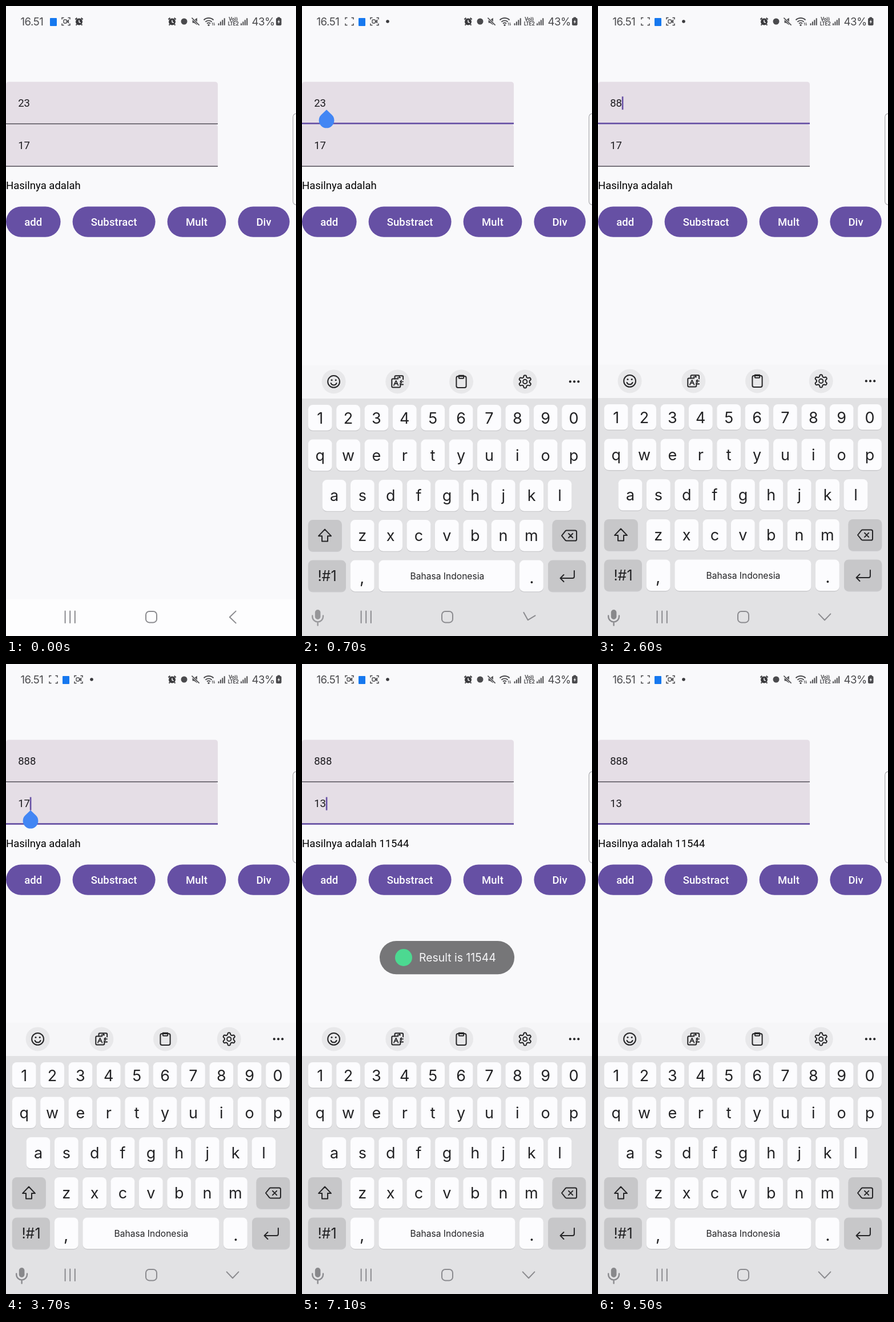
Recreate the animation shown at these times as an HTML page. Size 508 by 1101 pixels, loop 9.7 s.

```html
<!DOCTYPE html>
<html lang="id">
<head>
<meta charset="utf-8">
<title>Calculator demo</title>
<style>
html, body { margin: 0; width: 100%; height: 100%; overflow: hidden; background: #f9f9fb; }
svg { display: block; width: 100vw; height: 100vh; }
.app { font: 18.52px Roboto, sans-serif; fill: #1c1b1f; }
.ui { font-family: Inter, Roboto, sans-serif; }
.mid { text-anchor: middle; }
.line { fill: none; stroke: #252527; stroke-width: 2; stroke-linecap: round; stroke-linejoin: round; }
.nav { fill: none; stroke: #8b8b8f; stroke-width: 2; stroke-linecap: round; stroke-linejoin: round; }
.stat { fill: none; stroke: #4a4a4d; stroke-width: 1.5; }
</style>
</head>
<body>
<svg id="stage" viewBox="0 0 508 1101" preserveAspectRatio="none"></svg>
<script>
const LOOP = 9700, PURPLE = '#6650a4', DARK = '#4a4a4d';
const PITCH = 49.37;

const rect = (x, y, w, h, r, fill, more = '') =>
  `<rect x="${x}" y="${y}" width="${w}" height="${h}" rx="${r}" fill="${fill}" ${more}/>`;
const circle = (x, y, r, fill, more = '') =>
  `<circle cx="${x}" cy="${y}" r="${r}" fill="${fill}" ${more}/>`;
const path = (d, cls = 'line', more = '') => `<path d="${d}" class="${cls}" ${more}/>`;
const text = (x, y, s, cls, more = '') => `<text x="${x}" y="${y}" class="${cls}" ${more}>${s}</text>`;
const group = (id, body, more = '') => `<g id="${id}" ${more}>${body}</g>`;
const at = (x, y, body) => `<g transform="translate(${x} ${y})">${body}</g>`;

// ---- status bar ----
const brackets = path('M-7 -3.5V-6.5H-3.5M3.5 -6.5H7V-3.5M7 3.5V6.5H3.5M-3.5 6.5H-7V3.5', 'stat');
const camera = rect(-4, -3, 5.4, 6, 1.4, 'none', `stroke="${DARK}" stroke-width="1.4"`) +
  path('M1.8 0L4.4 -2.2V2.2Z', 'stat', 'stroke-width="1"');
const alarm = circle(0, .6, 6, '#3a3a3d') + path('M-6.6 -3.6L-3.6 -6.2M6.6 -3.6L3.6 -6.2M-4 5L-5.4 6.6M4 5L5.4 6.6',
  'stat', 'style="stroke:#3a3a3d;stroke-width:2"') + path('M0 -2.6V1L2.6 2.2', 'stat', 'style="stroke:#f9f9fb"');

function bars(x) {
  let s = '';
  for (let i = 0; i < 4; i++) s += rect(x + i * 3.4, 30.2 - i * 3, 2, 3.6 + i * 3, .6, DARK);
  return s;
}

const wifi = path('M-8.5 -2.5A12.2 12.2 0 0 1 8.5 -2.5M-5.6 .7A8 8 0 0 1 5.6 .7M-2.9 3.7A4.2 4.2 0 0 1 2.9 3.7',
  'stat', 'style="stroke-width:1.9"') + circle(0, 6.3, 1.6, DARK) +
  path('M7 7V2.2L5.8 3.6M9.6 2V6.8L10.8 5.4', 'stat', 'style="stroke-width:1"');
const muted = path('M-5.4 -2.4H-2.6L2.8 -6.2V6.2L-2.6 2.4H-5.4Z', '', `fill="${DARK}"`) +
  path('M-6.6 -6.4L6.6 6.6', 'stat', 'style="stroke:#f9f9fb;stroke-width:3.4"') +
  path('M-6.6 -6.4L6.6 6.6', 'stat');

const small = `fill="${DARK}" font-weight="700" font-size="8.4" letter-spacing="-.3"`;
const big = `fill="${DARK}" font-size="18.6" letter-spacing="-.45"`;
const status = text(25.5, 34, '16.51', 'ui', big) +
  group('recNew', brackets + group('recCam', camera)) +
  group('bag', rect(-6, -6, 12, 14, 1, '#1678ef')) +
  group('rec', brackets + camera) +
  group('bell', alarm) + circle(150, 27, 2.8, '#3a3a3d', 'id="dot"') +
  at(291, 27, alarm) + circle(312, 27, 5.5, DARK) + at(332, 27, muted) + at(355, 27, wifi) +
  bars(371.5) + text(398, 26, 'Vo))', 'ui mid', small) + text(398, 34.3, 'LTE2', 'ui mid', small) +
  bars(411) + text(430.5, 34, '43%', 'ui', big) +
  rect(473, 21, 9.5, 13, 2, DARK) + rect(475.5, 19.6, 4.5, 2, .5, DARK) +
  path('M478.6 23.6L475.6 28.2H477.6L476.8 31.6L480 26.8H478Z', '', 'fill="#f9f9fb"');

// ---- app ----
const field = y => path(`M0 ${y + 74}V${y + 5}Q0 ${y} 5 ${y}H366Q371 ${y} 371 ${y + 5}V${y + 74}Z`, '', 'fill="#e5dee6"');
const button = (x, w, s) => rect(x, 350.5, w, 53.2, 26.6, PURPLE) +
  text(x + w / 2, 383.7, s, 'app mid', 'style="fill:#fff;font-weight:500;letter-spacing:.13px"');

const app = field(132.5) + field(206.7) +
  rect(0, 205, 371, 1.4, 0, '#49454f', 'id="under1"') + rect(0, 279.2, 371, 1.4, 0, '#49454f', 'id="under2"') +
  text(21.2, 176.2, '', 'app', 'id="value1"') + text(21.2, 250.4, '', 'app', 'id="value2"') +
  rect(0, 0, 2.6, 23, 0, PURPLE, 'id="caret"') +
  group('handle', path('M0 -18.5L9.6 -9.2A13.4 13.4 0 1 1 -9.6 -9.2Z', '', 'fill="#4286f4"')) +
  text(0, 319.8, '', 'app', 'id="result" style="fill:#000"') +
  button(0, 95.6, 'add') + button(116.6, 145, 'Substract') + button(282.6, 102.8, 'Mult') + button(406.4, 90.4, 'Div') +
  `<clipPath id="pill">${rect(282.6, 350.5, 102.8, 53.2, 26.6, '#000')}</clipPath>` +
  circle(334, 377, 0, '#fff', 'id="ripple" clip-path="url(#pill)"') +
  rect(502.7, 188, 20, 159.5, 6, '#fdfdfe', 'stroke="#aeaeb2" stroke-width="1.3"');

// ---- keyboard ----
const key = (x, y, w, h, fill = '#fcfcfe', id = '') =>
  rect(x, y + 1.3, w, h, 8, '#cbcbce') + rect(x, y, w, h, 8, fill, id && `id="${id}"`);
const glyph = (x, y, s, size = 27) => text(x, y, s, 'ui mid', `font-size="${size}" fill="#222224"`);

function row(chars, x0, y, h, base) {
  return [...chars].map((c, i) => {
    const x = x0 + i * PITCH;
    return key(x, y, 41.8, h, undefined, 'key' + c) + glyph(x + 20.9, base, c);
  }).join('');
}

function gear() {
  let d = '';
  for (let i = 0; i < 72; i++) {
    const a = i * Math.PI / 36, r = 9.4 + 1.7 * Math.tanh(2.2 * Math.cos(6 * a));
    d += (i ? 'L' : 'M') + (r * Math.sin(a)).toFixed(2) + ' ' + (r * Math.cos(a)).toFixed(2);
  }
  return path(d + 'Z') + circle(0, 0, 3.6, 'none', 'class="line"');
}

const smile = circle(0, 0, 10.4, 'none', 'class="line"') + circle(-3.6, -2.8, 1.5, '#252527') +
  circle(3.6, -2.8, 1.5, '#252527') + path('M-5 2.6A5.4 5.4 0 0 0 5 2.6');
const swap = path('M-4.8 -5V-8.5Q-4.8 -10.2 -3 -10.2H8Q9.8 -10.2 9.8 -8.5V-4M9.8 5H6') +
  path('M1 -5H-8Q-10 -5 -10 -3V8Q-10 10 -8 10H3Q5 10 5 8V3') +
  path('M-6.4 6.4L-2.6 -1.6L1.2 6.4M-5 3.6H-.2', 'line', 'style="stroke-width:1.7"') +
  path('M0 -7H5L3 -9M9.8 0H4.8L7 2.4M4.8 0L7 -2.4', 'line', 'style="stroke-width:1.6"');
const clip = rect(-8.6, -9.4, 17.2, 20, 3, 'none', 'class="line"') + path('M-4.2 -10.6H4.2V-6.6Q4.2 -5.6 3.2 -5.6H-3.2Q-4.2 -5.6 -4.2 -6.6Z');

const tools = [smile, swap, clip, gear()].map((icon, i) =>
  at(55.6 + i * 111.7, 655.4, circle(0, 0, 21, '#e8e8ea') + icon)).join('') +
  [-7.2, 0, 7.2].map(d => circle(477 + d, 655.4, 2.1, '#252527')).join('');

const GREY = '#c7c7c9';
const keyboard = rect(0, 627, 508, 60, 0, '#f6f6f8') + rect(0, 685, 508, 420, 0, '#e2e2e4') + tools +
  row('1234567890', 10.8, 696, 44.6, 729) +
  row('qwertyuiop', 10.8, 756.5, 54.6, 793.8) +
  row('asdfghjkl', 35.6, 827, 54.6, 864) +
  key(10.8, 897, 59, 54.6, GREY) + row('zxcvbnm', 84.8, 897, 54.6, 934.4) +
  key(438.5, 897, 58.7, 54.6, GREY, 'erase') +
  key(10.8, 967.5, 66.2, 54.6, GREY) + key(84.8, 967.5, 41.8, 54.6) + key(134.4, 967.5, 239, 54.6) +
  key(381, 967.5, 41.8, 54.6) + key(431, 967.5, 66.2, 54.6, GREY) +
  glyph(44, 1003.6, '!#1', 25) + glyph(105.2, 1008, ',', 29) + glyph(402.5, 1008, '.', 29) +
  glyph(254.4, 1000.8, 'Bahasa Indonesia', 15.6) +
  at(40, 924.5, path('M0 -11L11 .6H5V10H-5V.6H-11Z')) +
  at(468, 924.5, path('M-13 0L-6.5 -8.2Q-5.8 -9 -4.6 -9H10.4Q13 -9 13 -6.4V6.4Q13 9 10.4 9H-4.6Q-5.8 9 -6.5 8.2ZM-1 -3.6L6.2 3.6M6.2 -3.6L-1 3.6')) +
  at(464.5, 996, path('M12.4 -10V0Q12.4 3 9.4 3H-12M-6 -3L-12 3L-6 9'));

// ---- navigation bar ----
const mic = rect(-4.8, -13, 9.6, 17, 4.8, '#88888b') + path('M-9.4 -2.6V-1A9.4 9.4 0 0 0 9.4 -1V-2.6M0 9V14.4', 'nav', 'style="stroke-width:2.4"');
const nav = path('M103.6 1057.5V1078M112.2 1057.5V1078M120.8 1057.5V1078', 'nav') +
  rect(245, 1058, 19, 19.4, 6, 'none', 'class="nav"') +
  group('back', path('M5.6 -10.4L-5.2 0L5.6 10.4', 'nav')) +
  `<g id="mic" transform="translate(27.6 1068)">${mic}</g>`;

// ---- overlays ----
const toast = rect(136, 484, 236, 58.2, 29.1, '#767678') + circle(178, 513, 15, '#4cd991') +
  text(205, 520, 'Result is 11544', 'ui', 'font-size="19.4" fill="#f6f6f8"');
const popup = rect(-39, -1, 78, 101, 13, '#000', 'opacity=".05"') + rect(-38, 1, 76, 99.5, 12, '#000', 'opacity=".12"') +
  rect(-38, 0, 76, 98.6, 12, '#fdfdff') + text(0, 67.8, '', 'ui mid', 'id="popChar" font-size="45" fill="#222224"');

document.getElementById('stage').innerHTML =
  rect(0, 0, 508, 1101, 0, '#f9f9fb') + rect(0, 1037, 508, 64, 0, '#fdfdfe') +
  status + app + group('keyboard', keyboard) + nav + group('toast', toast) + group('popup', popup);

const el = {};
document.querySelectorAll('#stage [id]').forEach(n => el[n.id] = n);
const set = (id, name, v) => el[id].setAttribute(name, v);
const move = (id, x, y, more = '') => set(id, 'transform', `translate(${x} ${y}) ${more}`);
const show = (id, v) => set(id, 'opacity', +v);
const clamp = v => Math.max(0, Math.min(1, v));
const ramp = (t, a, b) => clamp((t - a) / (b - a));
const within = (t, spans) => spans.find(s => t >= s[0] && t < s[1]);
const latest = (t, list) => list.filter(s => s[0] <= t).pop()[1];

// ---- script of the session, in ms ----
const TYPED1 = [[0, '23'], [1400, '2'], [1600, ''], [2300, '8'], [2500, '88'], [2800, '888']];
const TYPED2 = [[0, '17'], [4100, '1'], [4300, ''], [5400, '1'], [5700, '13']];
const BLINKS = [100, 1400, 1600, 2300, 2500, 2800, 2900, 3400, 3500, 4100, 4300, 4400, 5400, 5700, 5800];
const POPUPS = [[2300, 2400, '8'], [2500, 2600, '8'], [2800, 2900, '8'], [5400, 5500, '1'], [5700, 5800, '3']];
const ERASES = [[1400, 1500], [1600, 1700], [4100, 4200], [4300, 4400]];
const HANDLES = [[200, 1400], [3400, 4100]];

function underline(id, bottom, focus) {
  const h = 1.4 + 1.3 * focus;
  set(id, 'y', bottom - h);
  set(id, 'height', h);
  set(id, 'fill', focus > .3 ? PURPLE : '#49454f');
}

function draw(ms) {
  const t = Math.floor(ms / 100) * 100;
  const second = t >= 3400;

  const slide = ramp(t, 0, 300), x = 22 * slide;
  move('recNew', 83, 27);
  show('recNew', slide);
  show('recCam', t % 1000 < 500);
  move('bag', 83 + x, 27);
  move('rec', 105 + x, 27);
  move('bell', 128 + x, 27, `scale(${1 - .6 * slide})`);
  show('bell', 1 - slide);
  show('dot', slide);

  const v1 = latest(t, TYPED1), v2 = latest(t, TYPED2);
  el.value1.textContent = v1;
  el.value2.textContent = v2;
  el.result.textContent = 'Hasilnya adalah' + (t >= 6600 ? ' 11544' : '');
  underline('under1', 206.6, ramp(t, 0, 200) * (1 - ramp(t, 3300, 3500)));
  underline('under2', 280.8, ramp(t, 3300, 3500));

  const start = BLINKS.filter(b => b <= t).pop();
  const lit = start !== undefined && Math.floor((t - start) / 500) % 2 === 0;
  show('caret', lit);
  set('caret', 'x', 21 + 10.4 * (second ? v2 : v1).length);
  set('caret', 'y', second ? 232.6 : 158.2);
  show('handle', !!within(t, HANDLES));
  move('handle', 43, second ? 274 : 199.8);

  const press = ramp(t, 6400, 6700);
  set('ripple', 'r', 60 * press);
  show('ripple', .16 * (1 - ramp(t, 6600, 6900)));

  const p = ramp(t, 450, 750);
  move('keyboard', 0, 474 * Math.pow(1 - p, 3.4));
  show('keyboard', p > 0);
  move('back', 397, 1068, `rotate(${-90 * p})`);
  show('mic', p);

  set('erase', 'fill', within(t, ERASES) ? '#adadb0' : GREY);
  const pop = within(t, POPUPS);
  show('popup', !!pop);
  for (const c of '18') set('key' + c, 'fill', pop && pop[2] === c ? '#ededf0' : '#fcfcfe');
  if (pop) {
    move('popup', Math.max(48, 31.7 + (pop[2] - 1) * PITCH + .4), 587);
    el.popChar.textContent = pop[2];
  }
  show('toast', ramp(t, 6550, 6900) * (1 - ramp(t, 9000, 9400)));
}

const begin = performance.now();
function tick(now) {
  draw(Math.max(0, now - begin) % LOOP);
  requestAnimationFrame(tick);
}
draw(0);
requestAnimationFrame(tick);
</script>
</body>
</html>
```
